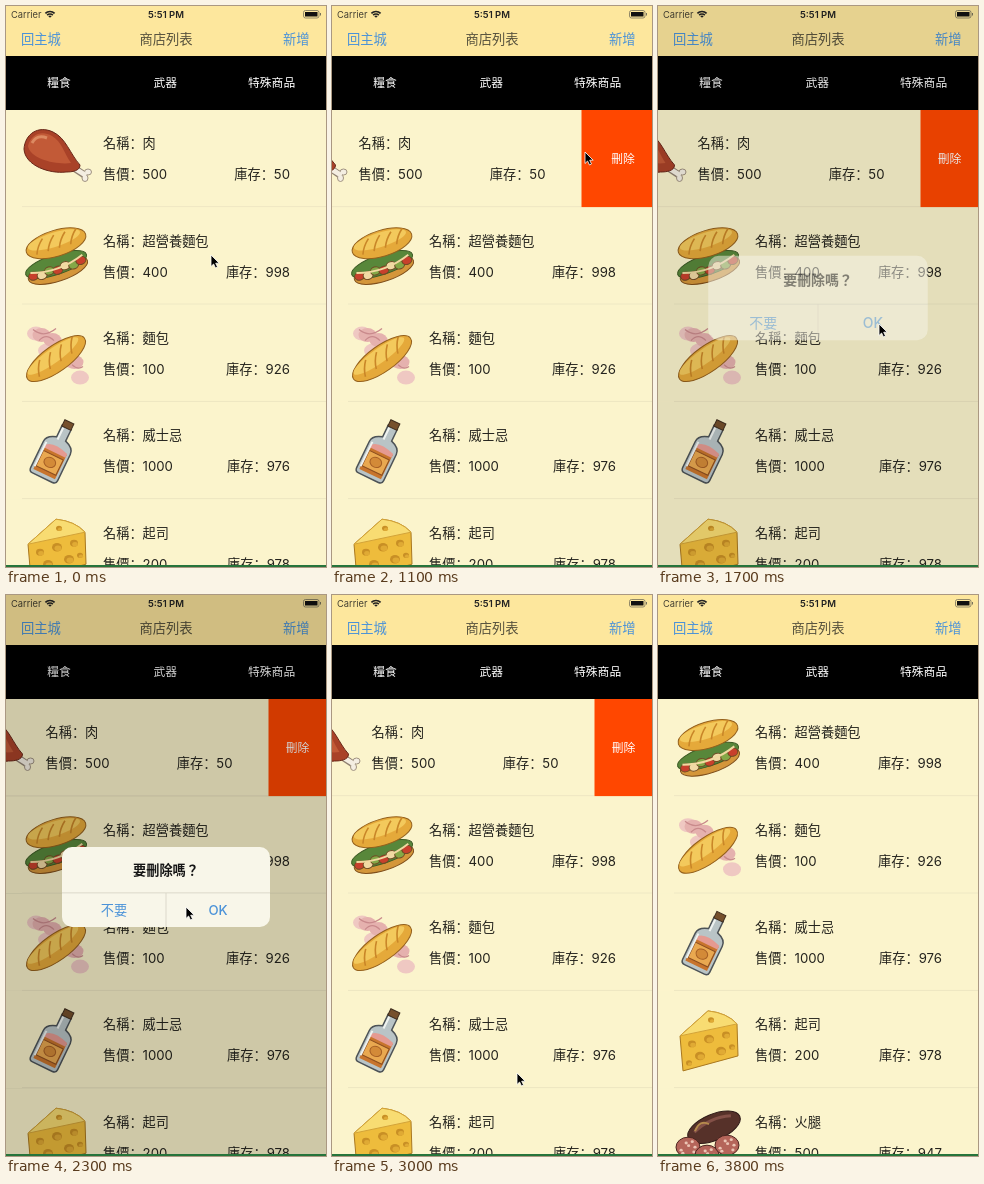
Write an HTML page with a canvas that moves like this. It is 320 px wide and 561 px high and loops after 3900 ms.

```html
<!DOCTYPE html>
<html lang="zh-Hant">
<head>
<meta charset="utf-8">
<style>
html, body { margin: 0; height: 100%; overflow: hidden; background: #fbf4cc; }
canvas { display: block; }
</style>
</head>
<body>
<canvas id="stage" width="320" height="561"></canvas>
<script>
const g = document.getElementById('stage').getContext('2d');
const LOOP = 3900, STEP = 100, ROW = 97.3, TOP = 104;
const FONT = 'Inter, "Noto Sans CJK TC", sans-serif';
const INK = '#24231d', BLUE = '#4a92d8';

// Tracks: [time, value...], linear between points
const cursorTrack = [[0, 205, 249], [300, 205, 247], [600, 213, 173], [700, 213, 171], [900, 165, 168],
  [1000, 200, 160], [1100, 253, 146], [1300, 283, 153], [1400, 283, 153], [1600, 236, 285],
  [1700, 221, 318], [1900, 212, 316], [2300, 180, 312], [2600, 180, 313], [3000, 185, 478], [3200, 188, 580]];
const swipeTrack = [[700, 0], [800, 22], [900, 52], [1000, 72], [1100, 70.5], [1200, 61], [1300, 57.5]];
const alertTrack = [[1600, 0], [1700, .5], [1800, .85], [1900, 1], [2500, 1], [2600, .6], [2800, 0]];
const removeTrack = [[3200, 0], [3300, .3], [3400, .75], [3500, 1]];
const presses = [[700, 900], [1300, 1400], [2400, 2500]];

function at(track, t) {
  const next = track.findIndex(p => p[0] > t);
  if (next === 0) return track[0].slice(1);
  if (next < 0) return track[track.length - 1].slice(1);
  const a = track[next - 1], b = track[next], k = (t - a[0]) / (b[0] - a[0]);
  return a.slice(1).map((v, i) => v + (b[i + 1] - v) * k);
}

function text(s, x, y, size, color = INK, align = 'left', weight = 400, family = FONT) {
  g.font = `${weight} ${size}px ${family}`;
  g.fillStyle = color;
  g.textAlign = align;
  g.fillText(s, x, y);
}

function rect(x, y, w, h, color) {
  g.fillStyle = color;
  g.fillRect(x, y, w, h);
}

function shape(d, fill, stroke, width = 1) {
  const path = new Path2D(d);
  if (fill) { g.fillStyle = fill; g.fill(path); }
  if (stroke) { g.strokeStyle = stroke; g.lineWidth = width; g.stroke(path); }
}

function oval(x, y, rx, ry, fill, stroke, angle = 0) {
  g.beginPath();
  g.ellipse(x, y, rx, ry, angle, 0, 7);
  g.fillStyle = fill;
  g.fill();
  if (stroke) { g.strokeStyle = stroke; g.lineWidth = 1; g.stroke(); }
}

function tilted(x, y, angle, draw) {
  g.save();
  g.translate(x, y);
  g.rotate(angle);
  draw();
  g.restore();
}

function loaf(rx, ry) {
  oval(0, 0, rx, ry, '#e5a93a', '#94601c');
  oval(-1, -ry * .3, rx * .88, ry * .55, '#f3c95c');
  for (let x = -rx * .6; x < rx * .8; x += rx * .38)
    shape(`M${x - 3} ${ry * .4}Q${x} ${-ry * .2} ${x + 7} ${-ry * .65}`, null, '#c98628', 1.6);
}

const icons = {
  meat() {
    shape('M68 58L80 66', null, '#8f8171', 7);
    oval(82, 62, 3.5, 3, '#f4eee2', '#a09280');
    oval(79, 68, 3, 3.5, '#f4eee2', '#a09280');
    shape('M68 58L80 65.500', null, '#f4eee2', 5);
    shape('M18 39C19 24 32 15 47 22C60 28 64 44 74 55C74 61 66 62 60 62C44 64 19 56 18 39Z', '#a94228', '#682719');
    shape('M22 36C25 24 36 20 46 26C56 32 58 43 65 53C50 55 24 49 22 36Z', '#c25a37');
    shape('M26 33Q31 24 41 28', null, '#dc8a62', 3);
  },
  sandwich() {
    tilted(51, 60, -.32, () => {
      oval(0, 3, 31, 11, '#d4963a', '#80501c');
      oval(0, -3, 32, 10, '#58873a', '#3d5b25');
      for (let i = 0; i < 7; i++) {
        oval(-25 + i * 8.3, 1 + i % 2 * 2, 5, 4, ['#c8402c', '#f1d9a4', '#84a847'][i % 3], '#6f4a24');
      }
      shape('M-27 -3Q0 6 28 -4', null, '#f0d9a0', 2);
    });
    tilted(50, 36, -.3, () => loaf(31, 13));
  },
  bread() {
    for (let i = 0; i < 9; i++) {
      oval(30 + i * 5.5, 29 + i * 4.5 + (i % 3) * 4 - (i % 2) * 7, 9, 7, i % 2 ? '#e5b1ae' : '#efc8c2');
    }
    shape('M27 25Q38 34 50 24M66 60Q72 66 77 62M33 36Q40 28 48 36', null, '#c98a8c', 1.3);
    tilted(50, 54, -.62, () => loaf(35, 13));
  },
  whisky() {
    tilted(46, 56, .45, () => {
      shape('M-5 -21V-34H5V-21Q15 -18 15 -11V18Q15 22 11 22H-11Q-15 22 -15 18V-11Q-15 -18 -5 -21Z', '#b9c4c6', '#4d5357', 1.5);
      shape('M-12 -9H12V18H-12Z', '#c8742c');
      shape('M-12 -9Q-5 -16 12 -10V-6H-12Z', '#e59a91');
      shape('M-11 -3H11V14H-11Z', '#e9a850', '#8b4e20');
      oval(0, 5, 6, 5, '#d38a38', '#a65f25');
      shape('M-3 -32V-19M-12 -12V15', null, '#eef2ef', 2);
      shape('M-5 -40H5V-33H-5Z', '#76502c', '#3f2d1d');
    });
  },
  cheese() {
    shape('M22 45L50 20Q69 22 79 33L80 65L25 80Z', '#eebc3c', '#a97820');
    shape('M22 45L50 20Q69 22 79 33Z', '#f8dc72', '#d3a338');
    for (const [x, y, r] of [[34, 53, 4], [51, 48, 5], [68, 44, 4], [42, 65, 5], [63, 60, 5], [31, 72, 3], [74, 56, 3], [53, 29, 3]]) {
      oval(x, y, r, r * .85, '#c88f25');
      oval(x + 1, y + 1, r * .7, r * .55, '#e0aa34');
    }
  },
  ham() {
    tilted(56, 39, -.4, () => {
      oval(0, 0, 28, 13, '#563129', '#2e1a17');
      shape('M-20 -3Q0 -11 20 -4', null, '#835047', 3);
    });
    shape('M37 43Q42 31 51 36', null, '#b58a4d', 2);
    for (const [x, y] of [[30, 59], [49, 67], [69, 57]]) {
      oval(x, y, 12, 10, '#b5655a', '#4c2520');
      for (let i = 0; i < 7; i++) oval(x + 7 * Math.cos(i * 2.4), y + 6 * Math.sin(i * 1.7), 1.6, 1.4, '#ebc4b4');
    }
  }
};

const items = [
  ['meat', '肉', 500, 50], ['sandwich', '超營養麵包', 400, 998], ['bread', '麵包', 100, 926],
  ['whisky', '威士忌', 1000, 976], ['cheese', '起司', 200, 978], ['ham', '火腿', 500, 947]
];

function field(label, value, x, y) {
  text(label, x, y, 13.2);
  text('：', x + 26.4, y, 13.2, INK, 'left', 400, '"Noto Sans CJK SC", sans-serif');
  text(value, x + 39.6, y, 13.2);
}

function row([icon, name, price, stock], y, swipe) {
  g.save();
  g.translate(0, y);
  rect(0, 0, 320, ROW, '#fbf4cc');
  g.save();
  g.translate(-swipe, 0);
  icons[icon]();
  field('名稱', name, 97, 38.3);
  field('售價', price, 97, 69.3);
  g.font = `400 13.2px ${FONT}`;
  field('庫存', stock, 284 - 39.6 - g.measureText(stock).width, 69.3);
  rect(16, ROW - 1, 304, 1, '#ebe4c0');
  g.restore();
  if (swipe) {
    rect(320 - swipe, 0, swipe, ROW, '#ff4700');
    text('刪除', Math.max(291, 349 - swipe), 53, 11.8, '#fff', 'center', 500);
  }
  g.restore();
}

function header() {
  rect(0, 0, 320, 50, '#fde79d');
  text('Carrier', 5, 12, 9.3, '#454133');
  for (const r of [1.5, 4, 6.5]) {
    g.beginPath();
    g.arc(44, 12, r, -2.36, -.78);
    g.strokeStyle = '#222';
    g.lineWidth = 1.7;
    g.stroke();
  }
  text('5:51 PM', 160, 12, 9.5, '#222', 'center', 600);
  g.strokeStyle = '#77725b';
  g.lineWidth = .8;
  g.beginPath();
  g.roundRect(297.5, 4.5, 15.5, 7.5, 2);
  g.stroke();
  rect(299, 6, 12.5, 4.5, '#111');
  rect(314, 7, 1, 2.5, '#77725b');
  text('回主城', 15, 38, 13.3, BLUE);
  text('商店列表', 160, 38, 13.3, '#55503c', 'center', 500);
  text('新增', 303.5, 38, 13.3, BLUE, 'right');
  rect(0, 50, 320, TOP - 50, '#000');
  ['糧食', '武器', '特殊商品'].forEach((s, i) => text(s, 53 + 106.3 * i, 81.3, 11.8, '#fff', 'center', 500));
}

function alertBox(p, opening) {
  rect(0, 0, 320, 561, `rgba(0,0,0,${.18 * p})`);
  const zoom = opening ? 1 + .11 * (1 - p) : 1;
  g.save();
  g.globalAlpha = p;
  g.translate(160, 292);
  g.scale(zoom, zoom);
  g.beginPath();
  g.roundRect(-104, -40, 208, 80, 10);
  g.fillStyle = '#f8f6e9';
  g.fill();
  rect(-104, 5.5, 208, .8, '#d5d2c2');
  rect(-.4, 6, .8, 34, '#d5d2c2');
  text('要刪除嗎？', 0, -12.300, 13.2, '#151515', 'center', 600);
  text('不要', -52, 28.3, 13.2, BLUE, 'center');
  text('OK', 52, 28.3, 13.2, BLUE, 'center', 500);
  g.restore();
}

function pointer(x, y, pressed) {
  if (pressed) {
    g.beginPath();
    g.arc(x, y, 17, 0, 7);
    g.strokeStyle = '#222';
    g.lineWidth = 1.3;
    g.stroke();
  }
  g.save();
  g.translate(x, y);
  shape('M0 0V11.500L2.600 9L4.500 13L6.500 12L4.700 8.200H8.200Z', '#000', '#fff', .8);
  g.restore();
}

function draw(t) {
  const [swipe] = at(swipeTrack, t), [gone] = at(removeTrack, t), [shown] = at(alertTrack, t);
  items.forEach((item, i) => {
    if (i || gone < 1) row(item, TOP + ROW * (i ? i - gone : 0), i ? 0 : swipe);
  });
  header();
  if (shown) alertBox(shown, t < 2000);
  rect(0, 559, 320, 2, '#26743b');
  pointer(...at(cursorTrack, t), presses.some(([a, b]) => t >= a && t < b));
}

function tick(now) {
  draw(Math.floor(now % LOOP / STEP) * STEP);
  requestAnimationFrame(tick);
}
draw(0);
requestAnimationFrame(tick);
</script>
</body>
</html>
```
